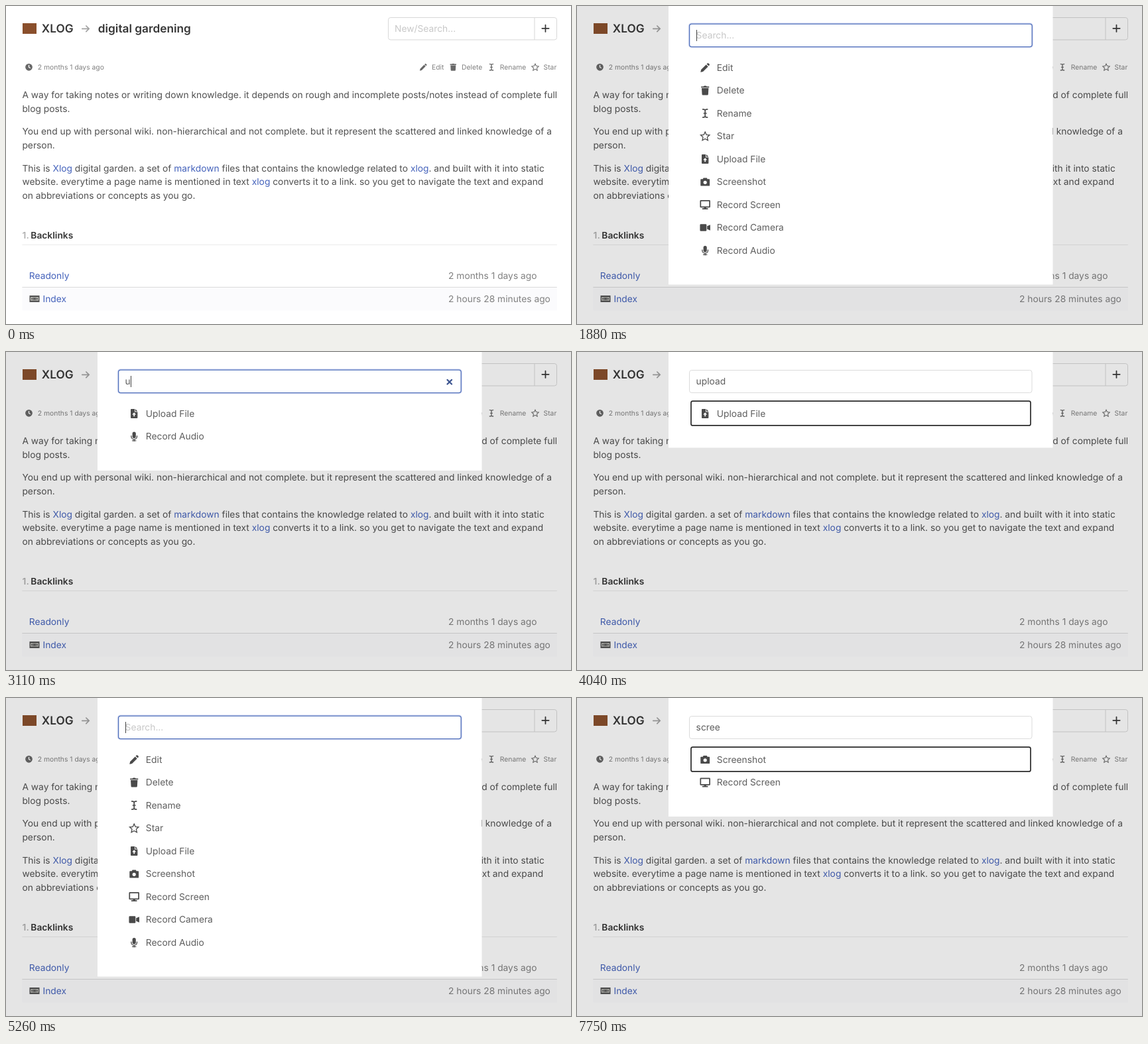
These frames come from a looping animation (852x480 px, 8 s). An HTML page with a canvas:

```html
<!DOCTYPE html>
<html lang="en">
<head>
<meta charset="utf-8">
<title>Command palette</title>
<style>
  html, body { margin: 0; width: 100%; height: 100%; overflow: hidden; background: #fff; }
  canvas { display: block; }
</style>
</head>
<body>
<canvas id="stage" width="852" height="480"></canvas>
<script>
const ctx = document.getElementById('stage').getContext('2d');
const LOOP = 8000;
const REM = 13.8;
const ROW = 34.5;
const INK = '#505050', STRONG = '#363636', MUTED = '#808080', LINK = '#4462bb';
const LABEL = '#5e5e5e', GLYPH = '#4a4a4a';

const starPath = () => {
  let d = '';
  for (let i = 0; i < 10; i++) {
    const a = -Math.PI / 2 + i * Math.PI / 5, r = i % 2 ? 3.9 : 8.2;
    d += (i ? 'L' : 'M') + (r * Math.cos(a)).toFixed(2) + ',' + (r * Math.sin(a) + .6).toFixed(2);
  }
  return d + 'Z';
};

// Each icon lives in a 16-unit box centred on the origin.
const ICONS = {
  edit: { fill: 'M-8,8L-7,3.6L1.8,-5.2L5.2,-1.8L-3.6,7Z M2.8,-6.2L4,-7.4Q5.2,-8.3 6.3,-7.3L7.3,-6.3Q8.3,-5.2 7.4,-4L6.2,-2.8Z' },
  trash: { fill: 'M-7,-7H-2.7L-2,-8H2L2.7,-7H7V-5H-7Z M-6,-4H6L5.4,6.6Q5.3,8 4,8H-4Q-5.3,8 -5.4,6.6Z' },
  cursor: { stroke: 'M-4,-7Q0,-7 0,-5V5Q0,7 -4,7M4,-7Q0,-7 0,-5M0,5Q0,7 4,7M-2,0H2', width: 2 },
  star: { stroke: starPath(), width: 1.5 },
  file: { fill: 'M-5,-8H1V-3H6V7Q6,8 5,8H-5Q-6,8 -6,7V-7Q-6,-8 -5,-8Z M2,-8L6,-4H2Z M0,-2L3.5,1.8H1V5H-1V1.8H-3.5Z' },
  camera: { fill: 'M-7,-5H-4L-3,-7H3L4,-5H7Q8,-5 8,-4V6Q8,7 7,7H-7Q-8,7 -8,6V-4Q-8,-5 -7,-5Z M3,1A3,3 0 1 0 -3,1A3,3 0 1 0 3,1Z' },
  display: { fill: 'M-7.5,-8H7.5Q9,-8 9,-6.5V3.5Q9,5 7.5,5H-7.5Q-9,5 -9,3.5V-6.5Q-9,-8 -7.5,-8Z M-7,-6V3H7V-6Z M-1.8,5H1.8V6H5V8H-5V6H-1.8Z' },
  video: { fill: 'M-7.5,-6H1Q2.5,-6 2.5,-4.5V4.5Q2.5,6 1,6H-7.5Q-9,6 -9,4.5V-4.5Q-9,-6 -7.5,-6Z M3.5,-2.5L9,-5V5L3.5,2.5Z' },
  mic: { fill: 'M-3,-5A3,3 0 0 1 3,-5V0A3,3 0 0 1 -3,0Z', stroke: 'M-5,-1V0A5,5 0 0 0 5,0V-1M0,5V8M-3,7.4H3', width: 1.5 },
  clock: { fill: 'M8,0A8,8 0 1 0 -8,0A8,8 0 1 0 8,0Z M-1,-5H1V-.5L4,1.5L3,3L-1,.5Z' },
  arrow: { stroke: 'M-6,0H6M1,-5L6,0L1,5', width: 2 },
  plus: { stroke: 'M-6,0H6M0,-6V6', width: 2 },
  close: { stroke: 'M-3.8,-3.8L3.8,3.8M-3.8,3.8L3.8,-3.8', width: 2.6 }
};
for (const icon of Object.values(ICONS)) {
  if (icon.fill) icon.fill = new Path2D(icon.fill);
  if (icon.stroke) icon.stroke = new Path2D(icon.stroke);
}

const COMMANDS = [
  ['edit', 'Edit'], ['trash', 'Delete'], ['cursor', 'Rename'], ['star', 'Star'],
  ['file', 'Upload File'], ['camera', 'Screenshot'], ['display', 'Record Screen'],
  ['video', 'Record Camera'], ['mic', 'Record Audio']
];

// Each step changes only the listed fields of the palette state.
const STEPS = [
  [0, { open: false, text: '', filter: '', caret: true, picked: false }],
  [1880, { open: true }],
  [2550, { caret: false }],
  [2960, { text: 'u', caret: true }],
  [3110, { filter: 'u' }],
  [3210, { text: 'up' }],
  [3300, { filter: 'up' }],
  [3630, { text: 'uplo' }],
  [3690, { text: 'uploa' }],
  [3740, { text: 'upload', filter: 'upload' }],
  [4040, { picked: true }],
  [4880, { picked: false }],
  [5180, { text: '' }],
  [5260, { filter: '' }],
  [5930, { caret: false }],
  [6490, { text: 's', caret: true }],
  [6590, { filter: 's' }],
  [6850, { text: 'sc' }],
  [6950, { filter: 'sc' }],
  [7260, { text: 'scre' }],
  [7370, { text: 'scree', filter: 'scree' }],
  [7750, { picked: true }]
];
const stateAt = t => Object.assign({}, ...STEPS.filter(s => s[0] <= t).map(s => s[1]));

function text(str, x, y, color = INK, size = REM, weight = 400) {
  ctx.font = `${weight} ${size}px Inter, sans-serif`;
  ctx.fillStyle = color;
  ctx.fillText(str, x, y);
  return ctx.measureText(str).width;
}

// Words between brackets are drawn as links.
function richLine(str, x, y) {
  str.split(/[[\]]/).forEach((part, i) => { x += text(part, x, y, i % 2 ? LINK : INK); });
}

function icon(name, x, y, color = GLYPH, scale = 0.8625) {
  const { fill, stroke, width } = ICONS[name];
  ctx.save();
  ctx.translate(x, y);
  ctx.scale(scale, scale);
  ctx.lineCap = 'round';
  ctx.fillStyle = ctx.strokeStyle = color;
  if (fill) ctx.fill(fill, 'evenodd');
  if (stroke) { ctx.lineWidth = width; ctx.stroke(stroke); }
  ctx.restore();
}

function rect(x, y, w, h, color) {
  ctx.fillStyle = color;
  ctx.fillRect(x, y, w, h);
}

function frame(x, y, w, h, color, width, radius = 3.4) {
  ctx.strokeStyle = color;
  ctx.lineWidth = width;
  ctx.beginPath();
  ctx.roundRect(x, y, w, h, radius);
  ctx.stroke();
}

function cassette(x, y) {
  rect(x, y, 15, 10, '#555');
  rect(x + 1.5, y + 2.5, 12, 5, '#c9c9c4');
  rect(x + 5, y + 3.5, 5, 3, '#555');
  for (const cx of [3.5, 11.5]) {
    ctx.beginPath();
    ctx.arc(x + cx, y + 5, 1.2, 0, 7);
    ctx.fill();
  }
}

function header() {
  rect(25, 26, 21, 16, '#8a4f2c');
  text('XLOG', 53.8, 40.2, STRONG, REM * 1.25, 600);
  icon('arrow', 120, 34.3, '#a3a3a3');
  text('digital gardening', 138.8, 40.2, STRONG, REM * 1.25, 600);
  frame(576.5, 17.5, 254, 33.5, '#d8d8d8', 1);
  rect(796.5, 17.5, 1, 33.5, '#d8d8d8');
  text('New/Search...', 586, 39, '#c8c8c8');
  icon('plus', 813.5, 33.8, STRONG);
}

function meta() {
  const label = (name, ix, str, x) => {
    icon(name, ix, 92.3, '#686868', 0.67);
    text(str, x, 96.1, MUTED, REM * 0.75);
  };
  label('clock', 34.5, '2 months 1 days ago', 47.8);
  label('edit', 629.3, 'Edit', 642);
  label('trash', 674.3, 'Delete', 687);
  label('cursor', 732, 'Rename', 744.8);
  label('star', 798, 'Star', 810.5);
}

function article() {
  [
    [139.1, 'A way for taking notes or writing down knowledge. it depends on rough and incomplete posts/notes instead of complete full'],
    [159.8, 'blog posts.'],
    [194.3, 'You end up with personal wiki. non-hierarchical and not complete. but it represent the scattered and linked knowledge of a'],
    [215, 'person.'],
    [249.5, 'This is [Xlog] digital garden. a set of [markdown] files that contains the knowledge related to [xlog]. and built with it into static'],
    [270.2, 'website. everytime a page name is mentioned in text [xlog] converts it to a link. so you get to navigate the text and expand'],
    [290.9, 'on abbreviations or concepts as you go.']
  ].forEach(([y, line]) => richLine(line, 24.4, y));
}

function backlinks() {
  text('1.', 24.6, 350.6, '#b0b0b0', REM, 600);
  text('Backlinks', 37.3, 350.6, STRONG, REM, 600);
  rect(24.4, 360, 806.4, 1, '#ebebeb');
  text('Readonly', 34.8, 411.8, LINK);
  text('2 months 1 days ago', 667, 411.8, MUTED);
  rect(24.4, 425, 806.4, 34.5, '#fbfbfd');
  rect(24.4, 424, 806.4, 1, '#dbdbdb');
  cassette(35.5, 437);
  text('Index', 55.5, 447.2, LINK);
  text('2 hours 28 minutes ago', 667, 447.2, MUTED);
}

function searchField({ text: query, caret, picked }) {
  if (picked) {
    frame(169.5, 27.5, 516.5, 34, '#dbdbdb', 1);
  } else {
    frame(168.8, 26.4, 518.2, 35.8, 'rgba(72,95,199,.2)', 2.2, 4);
    frame(169.6, 27.1, 516.6, 34.5, '#5070bb', 1.3);
  }
  const width = text(query || 'Search...', 179.6, 49.4, query ? LABEL : '#c8c8c8');
  if (picked) return;
  if (query) icon('close', 668.8, 45.2, '#3d5590');
  if (caret) rect(Math.round(179.6 + (query ? width : 0)), 36, 1, 17, '#444');
}

function palette(state) {
  const found = COMMANDS.filter(c => c[1].toLowerCase().includes(state.filter));
  rect(0, 0, 852, 480, 'rgba(10,10,10,.105)');
  rect(138, 0, 579.5, 110 + ROW * found.length, '#fff');
  searchField(state);
  found.forEach(([name, label], i) => {
    icon(name, 193.2, 93 + ROW * i);
    text(label, 210.8, 97.9 + ROW * i, LABEL);
  });
  if (state.picked) frame(172, 74.1, 512, 36.8, '#2a2a2a', 1.7, 2.5);
}

function draw(now) {
  const state = stateAt((now - start) % LOOP);
  ctx.textRendering = 'geometricPrecision';
  rect(0, 0, 852, 480, '#fff');
  header();
  meta();
  article();
  backlinks();
  if (state.open) palette(state);
}

const start = performance.now();
function tick() {
  draw(performance.now());
  requestAnimationFrame(tick);
}
tick();
</script>
</body>
</html>
```
